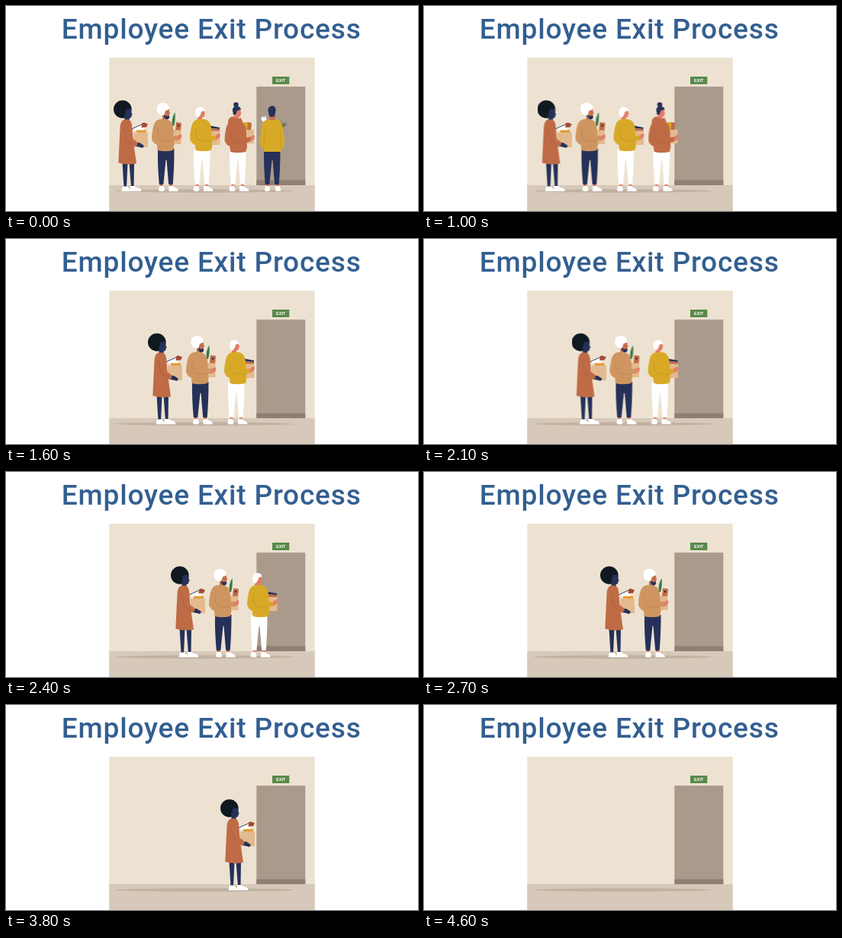
Write an HTML page without scripts that moves like this. It is 540 by 270 pixels and loops after 5600 ms.

```html
<!DOCTYPE html>
<html lang="en">
<head>
<meta charset="utf-8">
<title>Employee Exit Process</title>
<style>
html, body { margin: 0; width: 100%; height: 100%; overflow: hidden; background: #fff; }
svg { display: block; width: 100%; height: 100%; }
.title { font: 500 37px Roboto, "Open Sans", sans-serif; letter-spacing: .8px; fill: #335f91; }
.sign { font: 700 5.6px "Liberation Sans", Arial, sans-serif; fill: #fff; }

.rust { fill: #bf6b45; }
.camel { fill: #cf9560; }
.mustard { fill: #d8a926; }
.navy { fill: #253159; }
.ink { fill: #101820; }
.white { fill: #fff; }
.box { fill: #e3ba8f; }
.pink { fill: #e47c68; }
.brown { fill: #c4704f; }
.leaf { fill: #3f7a48; }
.fold { fill: none; stroke: #0002; stroke-width: .7; }

.queue { animation: walk 5.6s infinite; }
.worker { animation: 5.6s step-end infinite; }
.first { animation-name: leave1; }
.second { animation-name: leave2; }
.third { animation-name: leave3; }
.fourth { animation-name: leave4; }
.last { animation-name: leave5; }

/* six hops per turn, each hop lands at once */
@keyframes walk {
  0% { transform: translateX(0); animation-timing-function: step-end; }
  17.85% { transform: translateX(0); animation-timing-function: steps(6, jump-start); }
  28.56% { transform: translateX(45px); animation-timing-function: step-end; }
  37.49% { transform: translateX(45px); animation-timing-function: steps(6, jump-start); }
  48.2% { transform: translateX(90px); animation-timing-function: step-end; }
  57.13% { transform: translateX(90px); animation-timing-function: steps(6, jump-start); }
  67.85% { transform: translateX(140px); animation-timing-function: step-end; }
  76.78% { transform: translateX(140px); animation-timing-function: steps(3, jump-start); }
  82.13%, 100% { transform: translateX(190px); }
}
@keyframes leave1 { 0% { opacity: 1; } 8.92%, 100% { opacity: 0; } }
@keyframes leave2 { 0% { opacity: 1; } 28.56%, 100% { opacity: 0; } }
@keyframes leave3 { 0% { opacity: 1; } 48.2%, 100% { opacity: 0; } }
@keyframes leave4 { 0% { opacity: 1; } 67.85%, 100% { opacity: 0; } }
@keyframes leave5 { 0% { opacity: 1; } 82.13%, 100% { opacity: 0; } }
</style>
</head>
<body>
<svg viewBox="0 0 540 270">
  <defs>
    <g id="shoes">
      <path class="white" d="M1.500 237H7L8.500 242Q8.500 244 4.500 244Q.5 244 .5 242Z"/>
      <path class="white" d="M14 237H19Q22 240 25 240.500Q27 242 26 244H14Z"/>
    </g>
    <path id="ankles" d="M2.500 231H6.500V238.500H2.500ZM15 231H19V238.500H15Z"/>
    <path id="trousers" d="M0 188H21.500Q21.500 214 19.700 235H14.200L11.500 203H10.500L7.300 235H1.800Q-.5 210 0 188Z"/>
    <path id="face" d="M0 -6H6Q7.500 -3 7 -1L8.300 1.500L7 2.500Q7.500 6 4 6.500L4.500 12H-2V1Z"/>
    <path id="sweater" d="M11 0Q4 1 2 10Q0 18 0 26Q1 31 7 34L7.500 41Q17 43.500 28 41L29.500 34L29 29L34 27V21.500L28.500 22Q29 13 27 7Q25 1 18 0Z"/>
    <path id="sleeve" class="fold" d="M8 12Q7 22 11 27Q18 30 28 28.500"/>
    <path id="hand" d="M0 0Q4 -4 7 -4Q8 -1 6 2L0 5Z"/>
  </defs>

  <text class="title" x="269.200" y="43" text-anchor="middle">Employee Exit Process</text>

  <rect x="135.300" y="68" width="269.400" height="202" fill="#ede2d1"/>
  <rect x="135.300" y="236" width="269.400" height="34" fill="#d6c9b9"/>
  <rect x="328.300" y="106.200" width="64" height="129.800" fill="#a99a8b"/>
  <rect x="328.300" y="229.500" width="64" height="6.500" fill="#8f7f72"/>
  <rect x="349" y="93" width="22.300" height="10" fill="#588a4a"/>
  <text class="sign" x="360.200" y="100.100" text-anchor="middle">EXIT</text>
  <ellipse cx="260.500" cy="243.500" rx="116.500" ry="2.200" fill="#c0b1a1"/>

  <g class="worker first">
    <path class="white" d="M334 148L337 145L338 148L340 144L342 151L339 157Z"/>
    <path d="M358 160L361 151L362 155L368 152.500L365 156L369 156L361 161Z" fill="#66735c"/>
    <path class="brown" d="M345 140H353V152H345Z"/>
    <path class="navy" d="M343.500 138Q343 132 349 131.500Q354 132 353.500 138L352 145Q348 147 345 145Z"/>
    <use href="#ankles" class="brown" x="338.500"/>
    <path class="white" d="M340 237H345L346 242Q346 244 342 244Q339 244 339 242ZM353 237H358L360.500 242Q360 244 357 244Q353 244 353 242Z"/>
    <use href="#trousers" class="navy" x="338"/>
    <path class="mustard" d="M344 149.500Q336 150 335 158L332.500 178Q332 184 337 188L338 192H360.500L361 189Q365.500 185 365 178L362.500 158Q361 150 354 149.500Q349 151 344 149.500Z"/>
    <path class="fold" d="M339 164L338 188M359 164L360.500 188"/>
  </g>

  <g class="queue">
    <g class="worker second">
      <path class="box" d="M311 162.500H325V181H311Z"/>
      <path class="mustard" d="M312 153H318V163H312Z"/>
      <path class="rust" d="M317 153L322 154L321 163H316Z"/>
      <use href="#face" class="pink" x="300.500" y="140"/>
      <circle class="navy" cx="301.500" cy="130" r="3.300"/>
      <path class="navy" d="M297 138Q296 133 302 132Q307 132 308 136L303 138L301 143L298 143Z"/>
      <use href="#ankles" class="pink" x="293"/>
      <use href="#shoes" x="292"/>
      <use href="#trousers" class="white" x="293"/>
      <use href="#hand" class="pink" x="318.500" y="174"/>
      <use href="#sweater" class="rust" x="286.500" y="151"/>
      <path class="rust" d="M291 156Q290 147 297 145.500Q301 149 308 147.500L312 157Z"/>
      <use href="#sleeve" x="286.500" y="151"/>
    </g>

    <g class="worker third">
      <path class="box" d="M264 164.500H280.500V183H264Z"/>
      <path class="navy" d="M267 157.500L280 160V162L267 161Z"/>
      <path class="rust" d="M267 161L280 162V164.500H267Z"/>
      <use href="#face" class="pink" x="253" y="140.500"/>
      <path class="white" d="M248 141Q248 133 254 133Q260 133 260.500 138L256 139L255 143L252 147Q248 145 248 141Z"/>
      <use href="#ankles" class="pink" x="246"/>
      <use href="#shoes" x="245"/>
      <use href="#trousers" class="white" x="246"/>
      <use href="#hand" class="pink" x="273.500" y="172"/>
      <use href="#sweater" class="mustard" x="241" y="149"/>
      <use href="#sleeve" x="241" y="149"/>
    </g>

    <g class="worker fourth">
      <path class="leaf" d="M217.500 158Q217 146 221.500 140Q222.500 150 220 158Z"/>
      <path class="box" d="M216 163H229.500V182H216Z"/>
      <path class="rust" d="M223 153L230 154L229 163.500H222Z"/>
      <circle cx="226" cy="157.500" r="1.300" fill="#3a2430"/>
      <use href="#face" class="brown" x="207" y="140"/>
      <path class="navy" d="M206.500 142L209 145L214 144.500Q215 148 211.500 149.500Q206.500 149 206.500 142Z"/>
      <path class="white" d="M197.500 136Q197 127.500 206 127.500Q214 128 214 136L209 138L207 144Q198 144 197.500 136Z"/>
      <use href="#ankles" class="brown" x="199"/>
      <use href="#shoes" x="199.500"/>
      <use href="#trousers" class="navy" x="199"/>
      <use href="#hand" class="pink" x="223" y="173"/>
      <use href="#sweater" class="camel" x="191" y="149"/>
      <use href="#sleeve" x="191" y="149"/>
    </g>

    <g class="worker last">
      <path class="navy" d="M152.500 206H159.500L158 239H154.500ZM161.500 206H168L167.500 239H164Z"/>
      <path class="white" d="M153 237.500H158.500L163 242V244H151.500ZM163 237H168Q171 239.500 175 240Q178 242 177 244H163Z"/>
      <path class="white" d="M168 160L179 156L181 164H168Z"/>
      <path d="M171 163.500H184V167H171Z" fill="#e39a2d"/>
      <path class="box" d="M167 166.500H186V186H167Z"/>
      <path d="M161 163.500L179 155.500" stroke="#253159" stroke-width=".9"/>
      <path d="M178.500 154L181 153.500L186 155.500L184 159.500L177.500 160Z" fill="#a5492f"/>
      <circle class="ink" cx="152.800" cy="136" r="11.800"/>
      <use href="#face" class="navy" x="157.500" y="141.500"/>
      <path class="navy" d="M169 180L175 180L181 184L179 187L172 185L168 184Z"/>
      <path class="rust" d="M155 149.500Q150 151 149.500 160L147.300 206.500Q158 210 171 207.500L167.500 183L171 185L173 180L166.500 175L165 157Q164 150 160 149.500Z"/>
      <path class="fold" d="M155 160Q156 173 160 178L168 183"/>
    </g>
  </g>
</svg>
</body>
</html>
```
